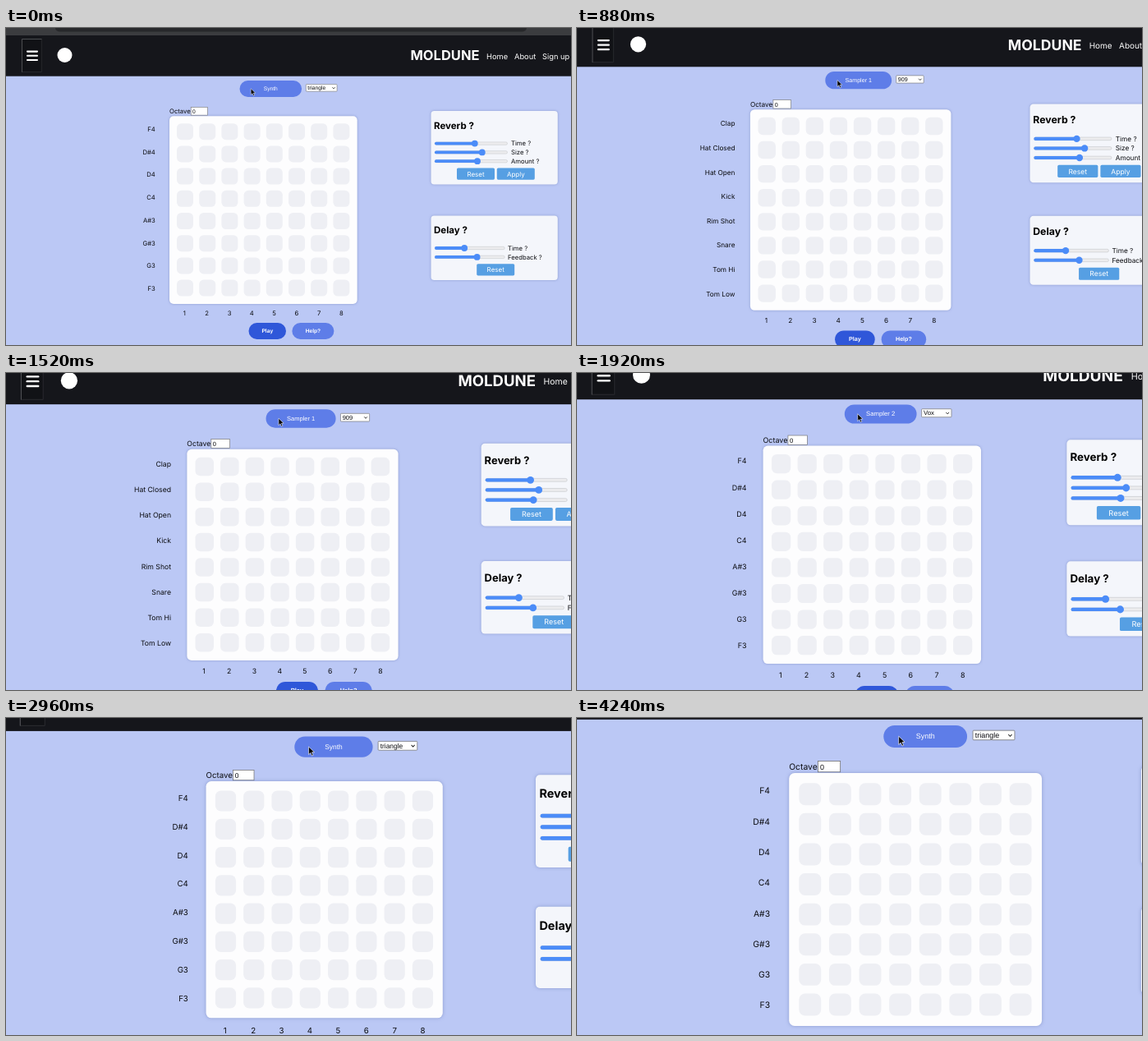
Write an HTML page that moves like this. It is 688 px wide and 386 px high and loops after 4320 ms.

```html
<!DOCTYPE html>
<html lang="en">
<head>
<meta charset="utf-8">
<title>Step sequencer</title>
<style>
  html, body { margin: 0; width: 100%; height: 100%; overflow: hidden; background: #bbc8f5; }
  svg { display: block; }
  text { font: 7.7px Inter, sans-serif; fill: #0b0c10; text-rendering: geometricPrecision; white-space: pre; }
  .mid { text-anchor: middle; }
  .end { text-anchor: end; }
  .white { fill: #fff; }
  .ui { font: 6.67px "Liberation Sans", sans-serif; }
  .bold { font-weight: 700; }
  .nav { font-size: 9.3px; fill: #fff; }
  .brand { font-size: 16.5px; font-weight: 700; fill: #fff; }
  .title { font-size: 11.5px; font-weight: 700; fill: #000; }
  .btn { font-size: 8px; fill: #fff; }
  .card { filter: drop-shadow(0 .5px 1.5px #5a6ba880); }
  .field { fill: #fff; stroke: #767676; stroke-width: .6; }
</style>
</head>
<body>
<svg width="688" height="386" viewBox="0 0 688 386"><g id="page"></g></svg>
<script>
const LOOP = 4320, STEP = 80;
const page = document.getElementById('page');

const rect = (x, y, w, h, fill, r = 0, cls = '') =>
  `<rect x="${x}" y="${y}" width="${w}" height="${h}" rx="${r}" ${fill ? `fill="${fill}"` : ''} class="${cls}"/>`;
const text = (x, y, str, cls = '', id = '') => `<text x="${x}" y="${y}" class="${cls}" id="${id}">${str}</text>`;
const path = (d, stroke, width) =>
  `<path d="${d}" fill="none" stroke="${stroke}" stroke-width="${width}" stroke-linecap="round"/>`;
const range = (n, fn) => Array.from({ length: n }, (_, i) => fn(i)).join('');

const pill = (x, y, w, fill, label, cls, id) =>
  rect(x, y, w, 20, fill, 10) + text(x + w / 2, y + 12, label, 'ui white mid ' + cls, id);
const button = (x, y, label) =>
  rect(x, y, 46, 14.2, '#569fe3', 1.6) + text(x + 23, y + 10, label, 'btn mid');
const slider = (y, width, thumb, label, labelX) =>
  `<rect x="522.2" y="${y - 1.7}" width="${width}" height="3.4" rx="1.7" fill="#ececee" stroke="#b4b5b9" stroke-width=".4"/>` +
  rect(522, y - 1.9, thumb - 522, 3.8, '#4b8cf8', 1.9) +
  `<circle cx="${thumb}" cy="${y}" r="3.9" fill="#4b8cf8"/>` +
  text(labelX, y + 2.8, label);
const card = (y, h, title) =>
  rect(517.5, y, 154.3, h, '#f4f6fb', 4, 'card') + text(521, y + 22, title, 'title');

const header =
  rect(0, -10, 760, 19.2, '#3b3c3f') + rect(60, -10, 574, 14.5, '#27282b', 5) +
  rect(0, 9, 760, 49.7, '#15161b') +
  rect(19.3, 13.3, 24, 40.2, '#111216') +
  path('M43.3 13.5V53.5H19.5', '#303136', .7) + path('M19.5 53.3V13.5H43', '#5b5c60', .8) +
  range(3, i => path(`M26 ${28.6 + 5.2 * i}H38`, '#fff', 2.1)) +
  '<circle cx="71.5" cy="33" r="9" fill="#fff"/>' +
  text(576.5, 39.4, 'MOLDUNE', 'brand end') +
  text(585, 37.5, 'Home', 'nav') + text(619, 37.5, 'About', 'nav') + text(653, 37.5, 'Sign up', 'nav');

const board =
  text(199, 104, 'Octave') + rect(225.2, 96.4, 20.2, 9.8, '', 0, 'field') + text(227, 103.8, '0', 'ui') +
  rect(199, 107.2, 228.7, 228.7, '#fdfdfe', 5, 'card') +
  range(64, i => rect(208 + 27.2 * (i % 8), 116.2 + 27.2 * (i >> 3), 20, 20, '#eeeff4', 5.5)) +
  range(8, i => text(181.8, 126 + 27.7 * i, '', 'end', 'row' + i) +
                text(217.4 + 27.3 * i, 350.4, i + 1, 'mid'));

const controls =
  pill(284.5, 64, 75.6, '#5e7de8', '', '', 'mode') +
  '<rect id="select" x="365.3" y="68.6" height="8.6" rx=".7" class="field"/>' +
  text(367.3, 75.1, '', 'ui', 'option') +
  '<path id="chevron" d="M-1.6 -.8L0 .9L1.6 -.8" fill="none" stroke="#222" stroke-width=".8"/>' +
  pill(295.5, 359, 45.5, '#2f57d9', 'Play', 'bold') +
  pill(348.4, 359, 51, '#5e7de8', 'Help?', 'bold');

const effects =
  card(101, 89.5, 'Reverb ?') +
  slider(140.6, 88.3, 570.8, 'Time ?', 615) +
  slider(151.4, 88.3, 579.8, 'Size ?', 615) +
  slider(162.2, 88.3, 574, 'Amount ?', 615) +
  button(549, 170.5, 'Reset') + button(597.8, 170.5, 'Apply') +
  card(228.4, 78.6, 'Delay ?') +
  slider(268, 85, 558.2, 'Time ?', 611) +
  slider(278.9, 85, 573.6, 'Feedback ?', 611) +
  button(573.2, 287.2, 'Reset');

const cursor = '<path d="M298.2 73.8v7.6l1.8-1.7 1.3 2.9 1.3-.6-1.3-2.8h2.4z" fill="#000" stroke="#fff" stroke-width=".5"/>';

page.innerHTML = header + board + controls + effects + cursor;

const notes = ['F4', 'D#4', 'D4', 'C4', 'A#3', 'G#3', 'G3', 'F3'];
const drums = ['Clap', 'Hat Closed', 'Hat Open', 'Kick', 'Rim Shot', 'Snare', 'Tom Hi', 'Tom Low'];
const synth = { name: 'Synth', option: 'triangle', width: 37.8, rows: notes };
const modes = [
  [0, synth],
  [320, { name: 'Sampler 1', option: '909', width: 31.3, rows: drums }],
  [1600, { name: 'Sampler 2', option: 'Vox', width: 31.3, rows: notes }],
  [2880, synth]
];

const el = id => document.getElementById(id);
let shown;
function setMode(mode) {
  if (mode === shown) return;
  shown = mode;
  el('mode').textContent = mode.name;
  el('option').textContent = mode.option;
  el('select').setAttribute('width', mode.width);
  el('chevron').setAttribute('transform', `translate(${361.2 + mode.width} 73)`);
  mode.rows.forEach((label, i) => el('row' + i).textContent = label);
}

// Steady exponential zoom that settles gently at the end
const RATE = 7.9e-5, SETTLE = 3520, TAU = 300;
function zoom(t) {
  const steady = RATE * Math.max(0, Math.min(t, SETTLE) - 30);
  const rest = RATE * TAU * (1 - Math.exp(-Math.max(0, t - SETTLE) / TAU));
  return Math.exp(steady + rest);
}

function draw(now) {
  const t = Math.floor(now % LOOP / STEP) * STEP;
  const s = zoom(t);
  page.setAttribute('transform', `translate(${-28 * (s - 1)} ${-223 * (s - 1)}) scale(${s})`);
  setMode(modes.findLast(([start]) => t >= start)[1]);
  requestAnimationFrame(() => draw(performance.now() - begin));
}
const begin = performance.now();
draw(0);
</script>
</body>
</html>
```
